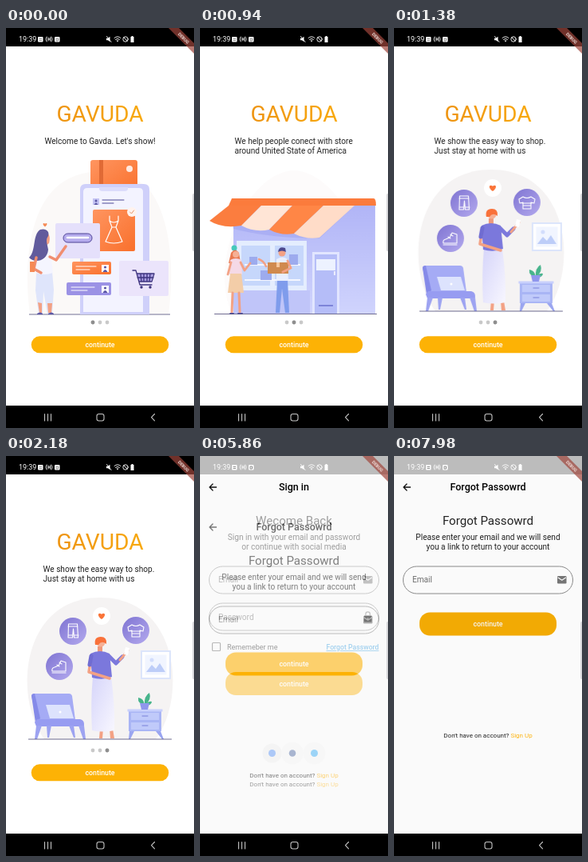
Recreate the animation shown at these times as an HTML page. Size 236 by 500 pixels, loop 8 s.

```html
<!DOCTYPE html>
<html lang="en">
<head>
<meta charset="utf-8">
<title>Shop app onboarding</title>
<style>
html, body { margin: 0; width: 100%; height: 100%; overflow: hidden; background: #fff; }
svg { display: block; width: 236px; height: 500px; }
text { font-family: Roboto, "Open Sans", sans-serif; font-size: 10.1px; fill: #222; }
.mid { text-anchor: middle; }
.logo { font-size: 28.2px; fill: url(#gold); }
.bar { font-size: 12.5px; font-weight: 500; fill: #000; }
.head { font-size: 15.1px; }
.label { fill: #6c6c6c; }
.cta { font-size: 8.8px; font-weight: 500; fill: #fff; text-anchor: middle; }
.small { font-size: 9px; }
.link { font-size: 8.7px; font-weight: 500; fill: #2f9be0; text-decoration: underline; text-anchor: end; }
.foot { font-size: 8px; text-anchor: middle; }
.foot tspan { fill: #fdb515; }
.line { fill: none; stroke-linecap: round; stroke-linejoin: round; }

.track, .dot, .press1, .press2, .signin, .forgot, .lightbar { animation: 8s linear infinite; }
.track { animation-name: swipe; }
.dot { animation-name: dot; animation-timing-function: step-end; }
.press1 { animation-name: press1; opacity: 0; }
.press2 { animation-name: press2; opacity: 0; }
.signin, .lightbar { animation-name: signin; opacity: 0; }
.forgot { animation-name: forgot; opacity: 0; }

@keyframes swipe {
  0%, 6.25% { transform: translateX(0); animation-timing-function: cubic-bezier(.45, .05, .75, .7); }
  8.75% { transform: translateX(-130px); animation-timing-function: cubic-bezier(.2, .45, .4, 1); }
  11.75% { transform: translateX(-236px); animation-timing-function: cubic-bezier(.45, .05, .75, .7); }
  14.25% { transform: translateX(-364.4px); animation-timing-function: cubic-bezier(.2, .45, .4, 1); }
  18.25%, 100% { transform: translateX(-472px); }
}
@keyframes dot {
  0% { transform: translateX(0); }
  8.6% { transform: translateX(9px); }
  14.1%, 100% { transform: translateX(18px); }
}
@keyframes press1 {
  0%, 43.5% { opacity: 0; }
  44.75%, 48.25% { opacity: .05; }
  51%, 100% { opacity: 0; }
}
@keyframes press2 {
  0%, 93.5% { opacity: 0; }
  99.7%, 100% { opacity: .04; }
}
@keyframes signin {
  0%, 51.7% { opacity: 0; }
  51.75% { opacity: .6; }
  52.2%, 100% { opacity: 1; }
}
@keyframes forgot {
  0%, 71.25% { opacity: 0; transform: translateY(118px); animation-timing-function: cubic-bezier(.4, 0, .3, 1); }
  76%, 100% { opacity: 1; transform: none; }
}
</style>
</head>
<body>
<svg viewBox="0 0 236 500">
<defs>
  <linearGradient id="gold"><stop stop-color="#ee9412"/><stop offset="1" stop-color="#f8a90d"/></linearGradient>
  <linearGradient id="fire" x2="1" y2="1"><stop stop-color="#ff9560"/><stop offset="1" stop-color="#f9702c"/></linearGradient>
  <linearGradient id="plum" x2="1" y2="1"><stop stop-color="#7f74d2"/><stop offset="1" stop-color="#b3a9ee"/></linearGradient>
  <linearGradient id="wall" x2="0" y2="1"><stop stop-color="#b1b5f7"/><stop offset="1" stop-color="#d0d4fd"/></linearGradient>
  <linearGradient id="skirt" x2="1" y2="1"><stop stop-color="#d6d5fa"/><stop offset="1" stop-color="#f8f7ff"/></linearGradient>
  <path id="heart" d="M0 4C-7-1-3.500-5.500 0-2.200C3.500-5.500 7-1 0 4Z"/>
  <rect id="field" x="11.500" y="138" width="213" height="34" rx="17" fill="none" stroke="#8a8a8a"/>
  <g id="email">
    <use href="#field"/>
    <text class="label" x="23" y="158">Email</text>
    <rect x="205" y="150" width="11.500" height="9.500" rx="1.200" fill="#757575"/>
    <path class="line" d="M206 152l4.800 3.200 4.800-3.200" stroke="#fafafa" stroke-width="1.100"/>
  </g>
  <g id="button">
    <rect x="32" width="172" height="29" rx="13" fill="#fdb205"/>
    <text class="cta" x="118" y="17.500">continute</text>
  </g>
  <g id="back"><path class="line" d="M20.500 39H12M16 35l-4 4 4 4" stroke="#111" stroke-width="1.300"/></g>
</defs>

<rect width="236" height="500" fill="#fff"/>

<!-- onboarding -->
<text class="logo mid" x="118" y="117">GAVUDA</text>
<g class="track">
  <g id="shopping">
    <text class="mid" x="118" y="145">Welcome to Gavda. Let's show!</text>
    <path d="M30 357C22 300 28 232 62 200C92 172 148 173 178 200C206 232 212 300 204 357Z" fill="#fbf9f8"/>
    <path d="M29 358H206" stroke="#4b4775" stroke-width=".8"/>
    <rect x="106" y="165" width="59" height="42" rx="3" fill="url(#fire)"/>
    <path d="M117 165h5v30h-5z" fill="#e06a35"/>
    <circle cx="155" cy="176" r="4" fill="#ffe9df"/>
    <path d="M93 358V202q0-7 7-7h73q7 0 7 7v156z" fill="#cfd0fa"/>
    <path d="M97 355V205q0-5 5-5h65q5 0 5 5v150z" fill="#f3f3ff"/>
    <path d="M117 199h36v2q0 3-4 3h-28q-4 0-4-3z" fill="#dcdcfb"/>
    <rect x="109" y="213" width="8" height="8" fill="#c4c3f3"/>
    <circle cx="113" cy="216" r="1.500" fill="#5b57a5"/><path d="M110.500 221q2.500-5 5 0z" fill="#5b57a5"/>
    <path class="line" d="M121 215h27M121 219h14" stroke="#4d4895"/>
    <rect x="109" y="227" width="53" height="52" rx="2" fill="url(#fire)"/>
    <path class="line" d="M130 235v6l3 8-8 18q10 4 21 0l-8-18 3-8v-6M130 241q5 4 11 0M133 249h5" stroke="#fff" stroke-width="1.200"/>
    <circle cx="158" cy="230" r="6" fill="#fff3ee"/><path class="line" d="M155.500 230l2 2 3-4" stroke="#e8956b"/>
    <rect x="62" y="244" width="56" height="44" rx="2" fill="#e5e0fb"/>
    <rect x="72" y="257" width="36" height="11" rx="5.500" fill="#b5abed" stroke="#4c4294"/>
    <path class="line" d="M77 262h26" stroke="#fff" stroke-width="2.500"/>
    <rect x="83" y="292" width="49" height="16" rx="2" fill="url(#fire)"/>
    <rect x="76" y="318" width="56" height="16" rx="2" fill="#9b92e5"/>
    <path class="line" d="M88 298h25M88 302h17M82 324h29M82 328h20" stroke="#fff"/>
    <g fill="#fff"><rect x="120" y="296" width="9" height="9"/><rect x="120" y="322" width="9" height="9"/></g>
    <g fill="#5b57a5"><circle cx="124.500" cy="299" r="1.600"/><path d="M121.500 305q3-6 6 0z"/><circle cx="124.500" cy="325" r="1.600"/><path d="M121.500 331q3-6 6 0z"/></g>
    <rect x="142" y="291" width="62" height="44" rx="2" fill="#ebe4fb"/>
    <path d="M164 307h21l-3 10h-15z" fill="#a79be0"/>
    <path class="line" d="M159 303h4l5 18h15M164 307h22l-3 10h-16M169 307l1 10M173 307v10M177 307v10M181 307l-1 10M165 312h20" stroke="#3e347f" stroke-width="1.300"/>
    <g fill="#3e347f"><circle cx="170" cy="324" r="1.700"/><circle cx="181" cy="324" r="1.700"/></g>
    <use href="#heart" transform="translate(49 246) scale(.6)" fill="#f58a55"/>
    <path d="M38 306l-1 22 4 29h5l1-28 5 28h6l2-30-2-22z" fill="#dfe5fb"/>
    <path d="M40 343l2 13h3v-12zM52 344l1 12h4l1-12z" fill="#f3a184"/>
    <path d="M39 281q9-5 17 0l3 25q-11 4-22 0z" fill="#f5f5ff"/>
    <path class="line" d="M55 286l8 4 12-17" stroke="#f08e70" stroke-width="3.500"/>
    <path d="M49 255q8 2 5 14l-5 4z" fill="#f3a184"/>
    <path d="M43 252c7-2 12 2 10 8c-4 5-1 10 0 17c-1 14-17 18-24 10c9-8 4-29 14-35z" fill="#615b9c"/>
    <path class="line" d="M38 287l-3 14 9 5" stroke="#f08e70" stroke-width="3.500"/>
    <path d="M30 292h6v13h-6z" fill="#f58a55"/>
    <path d="M39 357q4-3 7 0v1h-7zM53 357q4-3 7 0v1h-7z" fill="#5b57a5"/>
  </g>

  <g id="store" transform="translate(236)">
    <text x="43.500" y="145">We help people conect with store</text>
    <text x="43.500" y="157">around United State of America</text>
    <path d="M40 357C10 290 60 180 118 178C176 180 230 290 200 357Z" fill="#fdfbfb"/>
    <path d="M42 222H220V357H42Z" fill="url(#wall)"/>
    <path d="M46 266h88v62H46z" fill="#e4edfe"/>
    <path d="M52 272h36v50H52zM94 272h36v50H94z" fill="#c6d7fb"/>
    <path d="M56 296h70M56 315h70" stroke="#f4f6ff" stroke-width="2"/>
    <g fill="#9dabee"><path d="M62 286h10v10H62zM76 303h14v12H76zM112 283h11v13h-11z"/></g>
    <path d="M42 328h96v29H42z" fill="#c0c5f9"/>
    <path d="M141 280h34v77h-34z" fill="#e2e6ff"/>
    <path d="M144 283h28v74h-28z" fill="#b5bdf8"/>
    <path d="M146 289h24v14h-24z" fill="#edf2ff"/>
    <path d="M169 304v5" stroke="#fff" stroke-width="1.500"/>
    <path d="M149 347h18" stroke="#7d84d8" stroke-width="2"/>
    <path d="M36 222H194L150 263q-60 0-108-12z" fill="#8f95ec" opacity=".35"/>
    <path d="M40 213H218q3 0 3 9H36z" fill="#fb7b3c"/>
    <path d="M36 222H77L52 247q-24 4-40-6z" fill="#fb7d3f"/>
    <path d="M77 222h39L87 252q-18 4-35-5z" fill="#ffe5d6"/>
    <path d="M116 222h39L118 257q-16 3-31-5z" fill="#ff8646"/>
    <path d="M155 222h39L150 262q-16 3-32-5z" fill="#ffdcc8"/>
    <circle cx="43" cy="275" r="3.500" fill="#46c9bb"/>
    <path d="M39 281q5-7 10 0l2 13H36z" fill="#e9784f"/>
    <circle cx="45" cy="283" r="4" fill="#f6b095"/>
    <path d="M38 290q7-4 14 0l1 18H37z" fill="#f5d9e6"/>
    <path class="line" d="M51 293l5 10 7-9M39 293l-4 15" stroke="#f3a184" stroke-width="2.800"/>
    <path d="M38 307h14l3 24H35z" fill="#f3cda8"/>
    <path class="line" d="M41 331l-1 24M49 331l1 24" stroke="#f3a184" stroke-width="3"/>
    <path class="line" d="M38 357h4M48 357h5" stroke="#5b57a5" stroke-width="2"/>
    <path d="M97 315h13l2 41h-5l-4-30-3 30h-5z" fill="#7f9cec"/>
    <path d="M96 289q8-5 14 0l1 27H96z" fill="#e9effe"/>
    <circle cx="103" cy="281" r="4.500" fill="#f3a184"/>
    <path d="M98 280q1-8 9-5l1 5q-5-3-10 0z" fill="#4c488e"/>
    <path d="M85 293h26v14H85z" fill="#d08a4e"/><path d="M96 293h4v6h-4z" fill="#f7c79c"/>
    <path class="line" d="M110 291l4 9-10 5" stroke="#f3a184" stroke-width="3"/>
    <path class="line" d="M74 289q6 2 9 9" stroke="#f3a184" stroke-width="2.500"/>
    <path d="M18 357.500H222" stroke="#4b4775" stroke-width=".8"/>
  </g>

  <g id="home" transform="translate(472)">
    <text x="46.500" y="145">We show the easy way to shop.</text>
    <text x="46.500" y="157">Just stay at home with us</text>
    <path d="M48 354C8 300 20 177 118 177S228 300 188 354Z" fill="#f5f3f3"/>
    <g fill="url(#plum)"><circle cx="84" cy="219" r="17"/><circle cx="163" cy="218" r="17"/><circle cx="67" cy="263" r="17"/></g>
    <g class="line" stroke="#fff" stroke-width="1.100">
      <path d="M78.500 210h11l1 17h-5l-1-11-1 11h-5.500zM78 213h12M78 224h5M86 224h5"/>
      <path d="M158 211l-5 3 1 5 4-1v8h10v-8l4 1 1-5-5-3q-5 3-10 0zM157 219h12M158 222h10"/>
      <path d="M69 256l6 2v11H58q-1-4 3-5l5-2zM58 271h17M64 261l3 2M67 258l3 2"/>
    </g>
    <circle cx="120" cy="200" r="11" fill="#fff"/>
    <use href="#heart" x="120" y="200" fill="#fa7337"/>
    <rect x="170" y="244" width="36" height="34" fill="#fff" stroke="#dce5fb" stroke-width="2"/>
    <rect x="174.500" y="248.500" width="27" height="25" fill="#f1f5ff"/>
    <path d="M176 270l7-9 5 5 5-7 7 11z" fill="#bdcdf8"/><circle cx="183" cy="255" r="2.500" fill="#d2ddfc"/>
    <g transform="translate(1)">
      <path d="M31 300q0-3 4-3h43q3 0 4 3l4 30H38z" fill="#a5abf5"/>
      <path d="M31 300q0-3 4-3l7 31-6 5z" fill="#858ae8"/>
      <path d="M49 311h30l5 17H54z" fill="#dde3fd"/><circle cx="67" cy="320" r="1.500" fill="#fff"/>
      <path d="M35 333q2-5 7-4h50q6 1 5 9H37z" fill="#979cf1"/>
      <path d="M37 337h7l-6 17h-3zM90 337h7l2 17h-3zM50 337h6l-3 15h-2zM78 337h6l2 15h-2z" fill="#9da3f1"/>
    </g>
    <path d="M154 318h41v26h-41z" fill="#a9b5f5"/><path d="M152.500 316.500h44v3h-44z" fill="#c8d0fc"/>
    <path d="M157 321h35v9h-35zM157 333h35v9h-35z" fill="#c0cafa"/>
    <path class="line" d="M171 325h7M171 337h7" stroke="#7980d9"/>
    <path d="M155 344h6l-5 10h-2zM188 344h6l4 10h-2z" fill="#9aa5f0"/>
    <path d="M174 311q-9-1-8-9 7 1 8 9q-1-11 6-15 3 8-5 15q4-5 8-4 0 5-9 5z" fill="#47b48b"/>
    <path d="M168 309h12l-2 8h-8z" fill="#8f96ed"/>
    <path d="M118 341l-1 12h4l1-12zM130 341l1 12h5l-2-12z" fill="#f3a184"/>
    <path d="M109 276h23q5 36 4 67-14 3-28 0-2-35 1-67z" fill="url(#skirt)"/>
    <path d="M115 238h6v9h-6z" fill="#ee987b"/>
    <path d="M106 247q12-6 24 0l3 29q-12 5-25 1z" fill="#7b78dc"/>
    <path class="line" d="M129 250l9 9 8-8" stroke="#7b78dc" stroke-width="5"/>
    <path class="line" d="M143 255l10-12" stroke="#f3a184" stroke-width="3"/>
    <path d="M150 239l5 1-2 9-5-1z" fill="#fff"/>
    <path class="line" d="M107 251l-3 19 26 8" stroke="#f3a184" stroke-width="3.500"/>
    <path class="line" d="M107 250l-2 11" stroke="#6f6cd2" stroke-width="5"/>
    <circle cx="119" cy="233" r="5.500" fill="#f6b095"/>
    <path d="M112 236q-2-10 7-10 8 0 7 9-6-5-10 1z" fill="#f9713a"/>
    <path d="M28 354H208" stroke="#4b4775" stroke-width=".8"/>
  </g>
</g>
<g fill="#c9c9c9"><circle cx="109" cy="368" r="2.400"/><circle cx="118" cy="368" r="2.400"/><circle cx="127" cy="368" r="2.400"/></g>
<circle class="dot" cx="109" cy="368" r="2.400" fill="#8e8e8e"/>
<rect x="31.700" y="385.300" width="172.600" height="21" rx="10.500" fill="#fdb205"/>
<rect class="press1" x="31.700" y="385.300" width="172.600" height="21" rx="10.500"/>
<text class="cta" x="118" y="398.500">continute</text>

<!-- sign in -->
<g class="signin">
  <rect width="236" height="472" fill="#fafafa"/>
  <use href="#back"/>
  <text class="bar mid" x="118" y="43">Sign in</text>
  <text class="head mid" x="118" y="86">Wecome Back</text>
  <text class="mid" x="118" y="105">Sign in with your email and password</text>
  <text class="mid" x="118" y="117">or continue with social media</text>
  <use href="#email"/>
  <use href="#field" y="46"/>
  <text class="label" x="23" y="204.500">Password</text>
  <rect x="206" y="199" width="9.500" height="8.500" rx="1" fill="#757575"/>
  <path class="line" d="M208 199v-1.500a2.700 2.700 0 0 1 5.400 0V199" stroke="#757575" stroke-width="1.200"/>
  <circle cx="210.700" cy="203.200" r="1.100" fill="#fafafa"/>
  <rect x="15.500" y="233.500" width="10" height="10" rx="1" fill="none" stroke="#606060" stroke-width="1.200"/>
  <text class="small" x="34" y="242">Rememeber me</text>
  <text class="link" x="224.500" y="242">Forgot Password</text>
  <use href="#button" y="270"/>
  <circle cx="90.500" cy="371.500" r="12" fill="#ebebeb"/>
  <g fill="#f4f4f4"><circle cx="116" cy="371.500" r="14"/><circle cx="143.500" cy="371.500" r="14"/></g>
  <circle cx="90.500" cy="371.500" r="4.500" fill="#4285f4"/>
  <circle cx="116" cy="371.500" r="4.300" fill="#3b5998"/>
  <circle cx="143.500" cy="371.500" r="4.500" fill="#1da1f2"/>
  <text class="foot" x="118" y="412.500">Don't have on account? <tspan>Sign Up</tspan></text>
</g>

<!-- forgot password -->
<g class="forgot">
  <rect width="236" height="472" fill="#fafafa"/>
  <use href="#back"/>
  <text class="bar mid" x="118" y="43">Forgot Passowrd</text>
  <text class="head mid" x="118" y="86">Forgot Passowrd</text>
  <text class="mid" x="118" y="105">Please enter your email and we will send</text>
  <text class="mid" x="118" y="117">you a link to return to your account</text>
  <use href="#email"/>
  <use href="#button" y="195.500"/>
  <rect class="press2" x="32" y="195.500" width="172" height="29" rx="13"/>
  <text class="foot" x="118" y="351.500">Don't have on account? <tspan>Sign Up</tspan></text>
</g>

<!-- system bars -->
<rect width="236" height="23" fill="#000"/>
<rect class="lightbar" width="236" height="23" fill="#bcbcbc"/>
<text x="16" y="17" style="font-size:9px;fill:#fff">19:39</text>
<g fill="#fff">
  <rect x="40" y="11" width="6.500" height="6.500" rx="1"/>
  <rect x="61" y="11" width="6.500" height="6.500" rx="1"/>
  <path d="M126 12.700h2l2.500-2v6.600l-2.500-2h-2zM138.500 15.500h3l-1.500 2z"/>
  <path d="M156.500 11h1v-1h2v1h1v7h-4z"/>
</g>
<path d="M41.500 13.500h3.500M41.500 15.500h3.500M63 13h2.500v3H63z" fill="none" stroke="#777" stroke-width=".8"/>
<g class="line" stroke="#fff" stroke-width=".9">
  <path d="M51 11q-2 3 0 6M57 11q2 3 0 6M53 12v4M55.500 12v4M53 14h2.500M126.500 10.500l5.500 7"/>
  <path d="M136 12.500q4-3.500 8 0M137.500 14.300q2.500-2 5 0"/>
  <circle cx="150" cy="14" r="3.200"/><path d="M148 12l4 4"/>
</g>
<path d="M204 0h13l19 19v13z" fill="#a0463c" fill-opacity=".7"/>
<text class="mid" transform="translate(221.500 14) rotate(45)" style="font-size:5.400px;font-weight:700;fill:#efdcd8">DEBUG</text>
<path d="M236 207h-.5q-1.500 0-1.500 2v68q0 2 1.500 2h.5z" fill="#d9d9dc"/>
<rect y="472" width="236" height="28" fill="#000"/>
<g class="line" stroke="#c4c4c4" stroke-width="1.100">
  <path d="M48.500 482.500v8.500M52.500 482.500v8.500M56.500 482.500v8.500M186.500 482.500l-4 4.200 4 4.200"/>
  <rect x="114" y="482.500" width="9" height="8.500" rx="2.500"/>
</g>
</svg>
</body>
</html>
```
